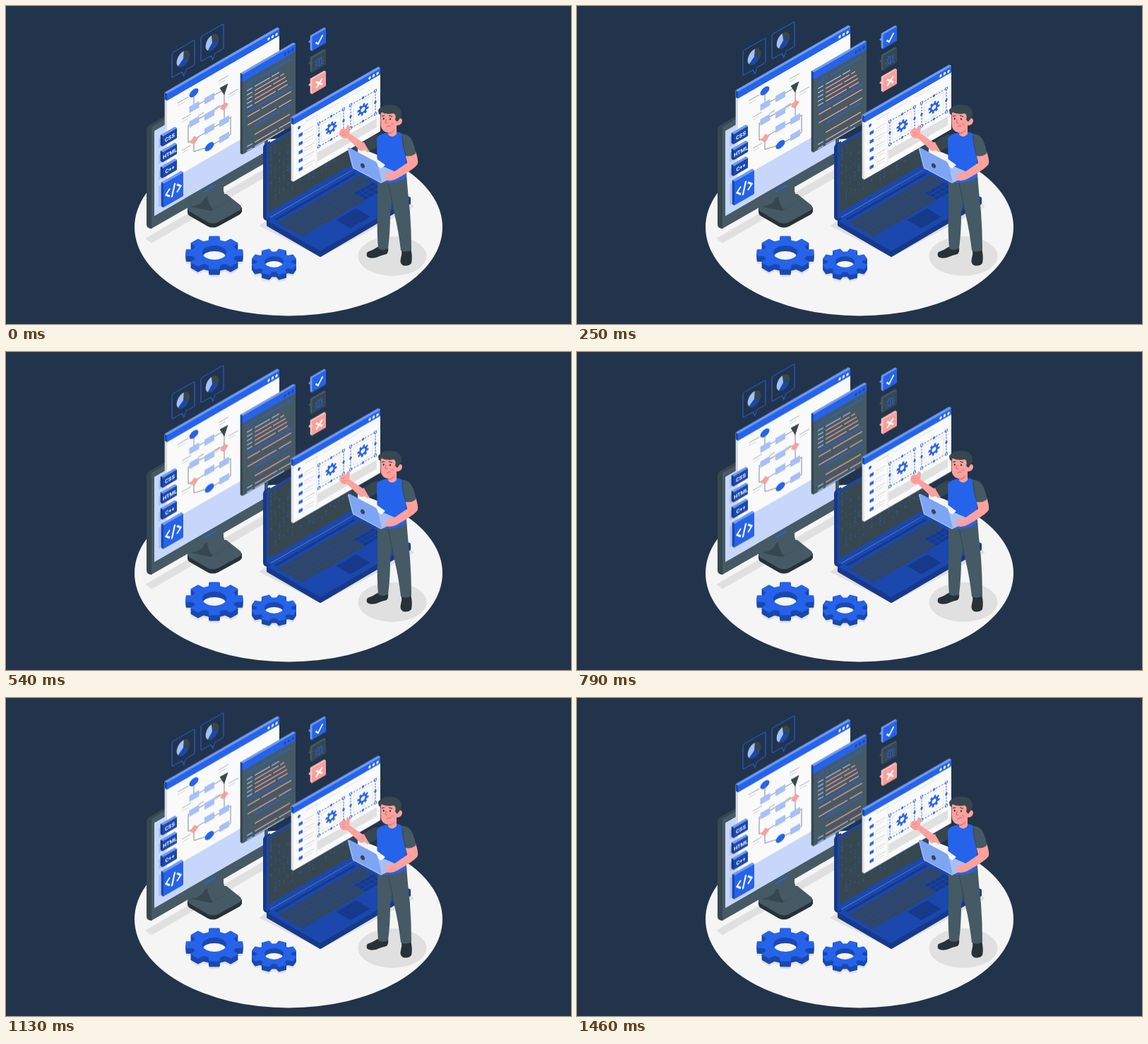
These frames come from a looping animation (800 px wide and 450 px high, 1500 ms). An HTML page:

```html
<!DOCTYPE html>
<html lang="en">
<head>
<meta charset="utf-8">
<title>Isometric workspace</title>
<style>
html, body { margin: 0; width: 100%; height: 100%; overflow: hidden; background: #22344b; }
svg { display: block; width: 100vw; height: 100vh; }
text { font-family: Roboto, Arial, sans-serif; font-weight: 700; }
.float { animation: float 1.5s linear infinite; }
@keyframes float { 50% { transform: translateY(-9px); } }
</style>
</head>
<body>
<svg id="stage" viewBox="0 0 800 450"></svg>
<script>
const BLUE = '#2563eb', DEEP = '#1a48ae', NAVY = '#16398a', PALE = '#a6c0f7', SKY = '#6f9bf3',
  SLATE = '#455a64', DARK = '#37474f', INK = '#263238', PINK = '#f9a09b', SKIN = '#ffa19c',
  GREY = '#e0e0e0', WHITE = '#fafafa', SLOPE = 0.577;

let seed = 7;
const rnd = () => (seed = seed * 16807 % 2147483647) / 2147483647;

const path = (d, fill, extra = '') => `<path d="${d}" fill="${fill}" ${extra}/>`;
const poly = (pts, fill, extra = '') => `<polygon points="${pts}" fill="${fill}" ${extra}/>`;
const rect = (x, y, w, h, fill, extra = '') =>
  `<rect x="${x}" y="${y}" width="${w}" height="${h}" fill="${fill}" ${extra}/>`;
const oval = (x, y, rx, ry, fill, extra = '') =>
  `<ellipse cx="${x}" cy="${y}" rx="${rx}" ry="${ry}" fill="${fill}" ${extra}/>`;
const stroke = (d, color, w = 1, extra = '') =>
  `<path d="${d}" fill="none" stroke="${color}" stroke-width="${w}" ${extra}/>`;
// Wall plane: x runs right and up, y runs straight down.
const iso = (x, y, body) => `<g transform="matrix(1 ${-SLOPE} 0 1 ${x} ${y})">${body}</g>`;
const float = body => `<g class="float">${body}</g>`;

// Upright slab with a lit top edge and a left side.
function slab(x, y, w, h, face, top, side, body = '', t = 3) {
  const k = t * 1.15;
  return iso(x, y,
    poly([0, 0, w, 0, w - t, -k, -t, -k], top, `stroke="${top}" stroke-width=".6" stroke-linejoin="round"`) +
    poly([0, 0, -t, -k, -t, h - k, 0, h], side, `stroke="${side}" stroke-width=".6" stroke-linejoin="round"`) +
    rect(0, 0, w, h, face, 'rx="1"') + body);
}

function panel(x, y, w, h, bar, face, side, dots, body) {
  const marks = [15, 9.5, 4].map(d => oval(w - d, bar / 2 + 0.6, 1.7, 2, dots)).join('');
  return slab(x, y, w, h, face, SKY, side,
    poly([0, 0, -3, -3.4, -3, bar - 3.4, 0, bar], DEEP) + rect(0, 0, w, bar, BLUE) + marks + body);
}

function cogPoints(r, inner, turn, squash = 1) {
  const pts = [];
  for (let i = 0; i < 8; i++)
    for (const [a, q] of [[-0.25, inner], [-0.17, r], [0.17, r], [0.25, inner]]) {
      const t = i * Math.PI / 4 + turn + a;
      pts.push((q * Math.cos(t)).toFixed(2), (q * Math.sin(t) * squash).toFixed(2));
    }
  return pts;
}

function floor() {
  return oval(400, 313, 218, 125.5, '#f5f5f5') +
    poly([198, 329, 206, 335, 372, 239, 366, 231], GREY, `stroke="${GREY}" stroke-linejoin="round"`) +
    poly([359, 311, 372, 302, 560, 262, 577, 284, 446, 355], GREY, `stroke="${GREY}" stroke-linejoin="round"`) +
    oval(547, 354, 48.5, 28, GREY);
}

function monitor() {
  const base = 'M257 285 Q257 282 262 280 L290 266 L312 266 L332 282 Q335 286 331 289 L300 306 Q293 309 286 306 L260 291 Q257 289 257 285Z';
  return path(base, INK, 'transform="translate(0 6)"') +
    path('M257 285 V292 H334 V285Z', INK) +
    path(base, SLATE) +
    path('M261 284 Q280 282 282 268 L308 254 V262 Q309 270 317 275 L290 290Z', DARK) +
    path('M285 269 L308 255 V262 Q309 270 317 275 L293 288 Q286 281 285 269Z', SLATE) +
    path('M199 174 Q199 171 202 169 L230 153 V180 L207 200 V315 Q199 315 199 309Z', DARK) +
    iso(206, 171, rect(0, 0, 165, 144, SLATE, 'rx="2"') + rect(4, 8, 156, 120.5, '#c7d7fb') +
      rect(75, 134, 16, 2, BLUE));
}

function flowchart() {
  const at = (x, y, body) => iso(x, y, body);
  const box = (x, y) => at(x, y, rect(-7, -4.5, 14, 9, PALE));
  const drop = (x, y) => at(x, y, oval(0, 0, 6.5, 5.2, BLUE));
  const gem = (x, y) => at(x, y, poly([-6, 0, 0, -6, 6, 0, 0, 6], PINK));
  const note = (x, y, w = 15) => at(x, y, rect(0, 0, w, 0.8, '#8d999e') + rect(0, 4, w * 0.7, 0.8, '#c4cacc'));
  const wires = stroke('M266 124V143L309 118V163L266 189M266 164L309 139M258 169V193L266 189M258 169L266 164' +
    'M318 158V182L288 199M314 160L319 157M266 189V206L288 199', '#607078', 0.8);
  return wires + drop(266, 123) + box(266.5, 143) + box(288, 131) + box(266.5, 164) + box(288, 154) +
    box(309, 163) + box(288, 174) + box(309, 186) + drop(288, 199) + gem(309, 142) + gem(266.5, 190) +
    poly([302.5, 116, 314.5, 109.5, 309, 126], DARK) +
    note(243, 137) + note(301, 106, 14) + note(315, 125, 14) + note(249, 160, 13) + note(249, 204, 13) +
    note(295, 145, 8) + note(272, 155, 8);
}

function codeLines() {
  const rows = [
    [18, PALE, 17, 22, PALE, 41, 11], [24, PALE, 17, 34, PINK, 53, 6], [30, PALE, 17, 24, PINK, 43, 18],
    [36, PALE, 17, 46, PINK], [42, PALE, 17, 30, PINK, 50, 14], [48, null, 7, 63, BLUE],
    [55, null, 7, 18, PINK, 27, 42], [61, null, 17, 50, BLUE], [67, null, 7, 41, PINK, 51, 18],
    [73, null, 17, 36, BLUE, 55, 13], [80, null, 17, 30, PINK, 49, 20], [86, null, 17, 50, PINK],
    [97, PALE, 17, 32, PINK, 51, 17], [103, PALE, 17, 42, PALE]
  ];
  const bar = (x, y, w, c) => rect(x, y, w, 1.5, c, 'rx=".7"');
  return stroke('M10 15l-3 3 3 3M12 22l3-8M17 15l3 3-3 3', BLUE, 1) + bar(24, 17, 45, BLUE) +
    rows.map(([y, lead, x, w, c, x2, w2]) => (lead ? bar(6, y + 8, 8, lead) : '') + bar(x, y + 8, w, c) +
      (x2 ? bar(x2, y + 8, w2, c) : '')).filter((_, i) => i !== 7 && i !== 10).join('');
}

function editor() {
  const frame = (x, y) => {
    const corner = [[0, 0], [35, 0], [35, 33], [0, 33]].map(([a, b]) =>
      rect(a - 1.4, b - 1.4, 2.8, 2.8, '#fff', `stroke="${BLUE}" stroke-width=".9"`)).join('');
    const mid = [[17.5, 0], [35, 16.5], [17.5, 33], [0, 16.5]].map(([a, b]) =>
      poly([a - 2.2, b, a, b - 2.2, a + 2.2, b, a, b + 2.2], BLUE)).join('');
    const cog = `<g transform="translate(17.5 16.5)">` + poly(cogPoints(8.2, 5.8, 0.2), BLUE) +
      oval(0, 0, 3, 3, WHITE) + '</g>';
    return iso(x, y, rect(4, 4, 27, 25, 'none', `stroke="${GREY}" stroke-width=".7"`) +
      rect(0, 0, 35, 33, 'none', `stroke="${BLUE}" stroke-width="1" stroke-dasharray="2.4 1.6"`) + corner + mid + cog);
  };
  let side = iso(415, 172, poly([-2, -1, 0, -2.6, 2, -1, 2, 1, 0, 2.6, -2, 1], BLUE));
  for (let i = 0; i < 5; i++)
    side += iso(414.5, 182.5 + i * 12.1, rect(0, -1, 5.5, 4.5, BLUE) +
      rect(8, -1, 14, 0.8, '#c3c9cb') + rect(8, 3, 12, 0.8, '#d5d9da'));
  return side + stroke('M440 154V226', GREY, 0.8) +
    iso(424, 163.5, rect(0, 0, 18, 1, '#cfd4d6') + rect(24, 0, 25, 1, '#dfe2e3') + rect(55, 0, 28, 1, GREY)) +
    iso(441, 207.5, rect(0, 0, 84, 12.5, GREY)) + frame(443, 166) + frame(488, 140);
}

function bubble(x, y, turn) {
  const slice = (a, b, c) => {
    const p = t => `${9.3 * Math.cos(t + turn)} ${9.3 * Math.sin(t + turn)}`;
    return path(`M0 0L${p(a)}A9.3 9.3 0 ${b - a > Math.PI ? 1 : 0} 1 ${p(b)}Z`, c);
  };
  return iso(x, y, stroke('M2 0H30Q32 0 32 2V33Q32 35 30 35H20L17 42L14 35H2Q0 35 0 33V2Q0 0 2 0Z', BLUE, 1) +
    `<g transform="translate(16 17.5) scale(1 1.15)">` + slice(-1.5, 0.5, DARK) + slice(0.5, 2.5, DEEP) +
    slice(2.5, 4.8, PALE) + '</g>');
}

function badge(y, face, top, glyph) {
  return poly([428, y + 20, 434, y + 13, 434, y + 23], top) + slab(433.5, y + 12.5, 19.5, 20, face, top, top, glyph, 2.5);
}

function badges() {
  const tick = stroke('M5 11L8.5 15L15 6', '#fff', 2.2);
  const bug = oval(10, 11, 3.5, 5, 'none', `stroke="${BLUE}" stroke-width=".9"`) +
    stroke('M10 7V16M6.5 9L4 7M6 12H3M7 14L4 17M13.5 9L16 7M14 12H17M13 14L16 17M8 6.5L7 4M12 6.5L13 4', BLUE, 0.8);
  const cross = stroke('M5.5 6L14.5 15M14.5 6L5.5 15', '#fff', 2.3);
  return badge(31, BLUE, SKY, tick) + badge(61.5, DARK, SLATE, bug) + badge(92, PINK, '#ffc1bd', cross);
}

function tags() {
  const shade = (y, h, w) => iso(216, y, rect(0, 0, w, h, '#a9c1f6'));
  const tag = (y, label) => shade(y + 4, 13, 20) + slab(222, y, 20, 14, DEEP, SKY, NAVY,
    `<text x="10" y="10" font-size="7.4" text-anchor="middle" fill="#fff">${label}</text>`);
  return tag(184.5, 'CSS') + tag(207, 'HTML') + tag(229.5, 'C++') + shade(255, 30, 25) +
    slab(223, 251.5, 28, 33.5, BLUE, SKY, DEEP,
      stroke('M9 12L3.5 17.5L9 23M19 12L24.5 17.5L19 23M16.2 8.5L11.8 26', '#fff', 2.4));
}

function laptop() {
  const pt = (u, v) => `${(370 + 128 * u + 75 * v).toFixed(1)},${(303 - 74 * u + 43 * v).toFixed(1)}`;
  const quad = (u, v, w, h, fill) => poly([pt(u, v), pt(u + w, v), pt(u + w, v + h), pt(u, v + h)].join(' '), fill);
  const round = c => `stroke="${c}" stroke-width="4" stroke-linejoin="round"`;
  let out = poly('371,303 445,345 571,272 571,279 445,353 371,310', NAVY, round(NAVY)) +
    poly([pt(0.01, 0.01), pt(0.99, 0.01), pt(0.99, 0.98), pt(0.01, 0.98)].join(' '), DEEP, round(DEEP));
  out += quad(0.05, 0.05, 0.88, 0.04, NAVY);
  for (let r = 0; r < 6; r++) {
    const v = 0.145 + r * 0.078;
    for (let c = 0; c < 17; c++) {
      const u = 0.035 + c * 0.054;
      if (r === 5 && c > 3 && c < 9) { if (c === 4) out += quad(u, v, 0.262, 0.062, DARK); continue; }
      out += quad(u, v, 0.046, 0.062, c > 12 && r > 2 ? NAVY : DARK);
    }
  }
  out += quad(0.38, 0.65, 0.22, 0.27, NAVY);
  out += path('M364 200Q364 197 367 195L374 191V302L370 304Q364 303 364 298Z', NAVY);
  let bits = '';
  for (let x = 5; x < 122; x += 6)
    for (let y = 8; y < 86; y += 5)
      if (rnd() < 0.55) bits += `<text x="${x}" y="${y + 2}" font-size="4.5" fill="${BLUE}" opacity="${(0.35 + rnd() * 0.6).toFixed(2)}">${rnd() < 0.6 ? 1 : 0}</text>`;
  return out + iso(369, 196, rect(0, 0, 129, 106, DEEP, 'rx="2"') + rect(2.5, 4, 124, 94, DARK) + bits);
}

function cog(x, y, r, turn, depth) {
  const pts = cogPoints(r, r * 0.76, turn, 0.575);
  const layer = (dy, c) => poly(pts, c, `transform="translate(${x} ${y + dy})" stroke="${c}" stroke-width="1.6" stroke-linejoin="round"`);
  let out = layer(depth + 3, GREY);
  for (let d = depth; d > 0; d--) out += layer(d, DEEP);
  const id = 'hole' + r;
  return out + layer(0, BLUE) + `<clipPath id="${id}">${oval(x, y, r * 0.43, r * 0.25, '#000')}</clipPath>` +
    oval(x, y, r * 0.43, r * 0.25, DEEP) +
    oval(x, y + depth * 0.75, r * 0.4, r * 0.2, '#f5f5f5', `clip-path="url(#${id})"`);
}

function man() {
  const shoes = path('M512 348Q519 346 526 341L541 341Q542 348 539 351Q530 353 524 356Q514 358 511 354Q510 350 512 348Z', INK) +
    path('M560 344L573 343Q576 355 574 364Q570 369 562 367Q557 364 559 357Q561 351 560 344Z', INK);
  const legs = path('M540 243L567 237Q569 266 572 291Q574 318 574 345Q567 350 559 346Q556 319 550 294Z', SLATE) +
    path('M526 242L547 245Q548 270 544 294Q544 320 541 343Q533 347 527 343Q525 319 526 293Z', SLATE) +
    stroke('M541 250Q545 268 549 290', DARK, 1);
  const arm = path('M512 191L524 193L514 206Q508 210 503 206L483 187Q475 188 473 183Q471 178 474 175Q477 172 481 174L483 169Q486 168 487 172L486 180L505 193Z', SKIN) +
    stroke('M475 179L480 178M476 183L481 182', '#e8837f', 0.7);
  const torso = path('M528 182Q517 183 507 193L514 205Q521 203 528 198Z', DARK) +
    path('M525 187Q528 181 541 179Q547 184 553 178Q563 180 566 186L567 242Q556 250 541 250Q532 250 526 247Z', BLUE);
  const head = path('M531 151Q530 163 531 171Q533 178 541 179V182Q547 188 553 181V169Q560 169 561 163Q561 158 556 159V149L540 145Z', SKIN) +
    path('M541 179Q548 178 551 173Q550 181 541 182Z', '#e8837f') +
    path('M528 153Q525 145 532 143Q536 139 545 140Q554 139 559 147Q562 154 557 160L554 164L551 161Q553 154 549 152Q538 154 531 150L531 154Z', DARK) +
    oval(534.7, 159.5, 1, 1.4, INK) + oval(544, 160, 1, 1.4, INK) +
    stroke('M532 156L536 155M542 155L547 156.5', INK, 1) +
    stroke('M538.5 160L537 165L540 165.5M539 171Q542 169 545 170', '#c85c5e', 0.9) + oval(547, 167, 2.5, 1.8, '#fb8d89');
  const device = poly('492,228 512,218 556,237 531,250', PALE, `stroke="${PALE}" stroke-linejoin="round"`) +
    poly('499,206 508,204 537,225 531,230', '#f5f5f5') +
    path('M484 202Q484 200 487 201L523 220Q525 221 526 224L532 249L530 250L493 230Q491 229 490 226Z', '#7ea4f4') +
    stroke('M484.5 202L491.5 229L531 250L556 238', PALE, 1.2) + oval(505, 226, 2.7, 3.7, DARK, 'transform="rotate(-28 505 226)"');
  const front = path('M565 208L580 206Q584 217 583 223Q581 229 554 244Q546 249 537 246L535 243L544 240L536 239L538 236L549 235L568 222Z', SKIN) +
    path('M560 181Q571 181 575 190Q580 201 580 209Q573 214 566 212Q560 197 560 181Z', SLATE) +
    stroke('M561 184Q562 200 566 212', DARK, 1);
  return shoes + legs + arm + torso + head + device + front;
}

document.getElementById('stage').innerHTML = floor() + monitor() +
  float(bubble(235, 66.5, 0) + bubble(276, 43.5, -0.2) +
    panel(228, 124, 159, 125, 10, WHITE, '#d9dee4', WHITE, '') + flowchart() + tags() +
    panel(335, 97, 75, 113, 10.5, SLATE, DARK, DEEP, codeLines())) +
  laptop() +
  float(panel(407, 159, 123, 89.5, 9, WHITE, '#dfe3e8', WHITE, '') + editor() + badges()) +
  man() + cog(295, 349, 40, 0, 8) + cog(379.5, 362, 31.5, Math.PI / 8, 7);
</script>
</body>
</html>
```
